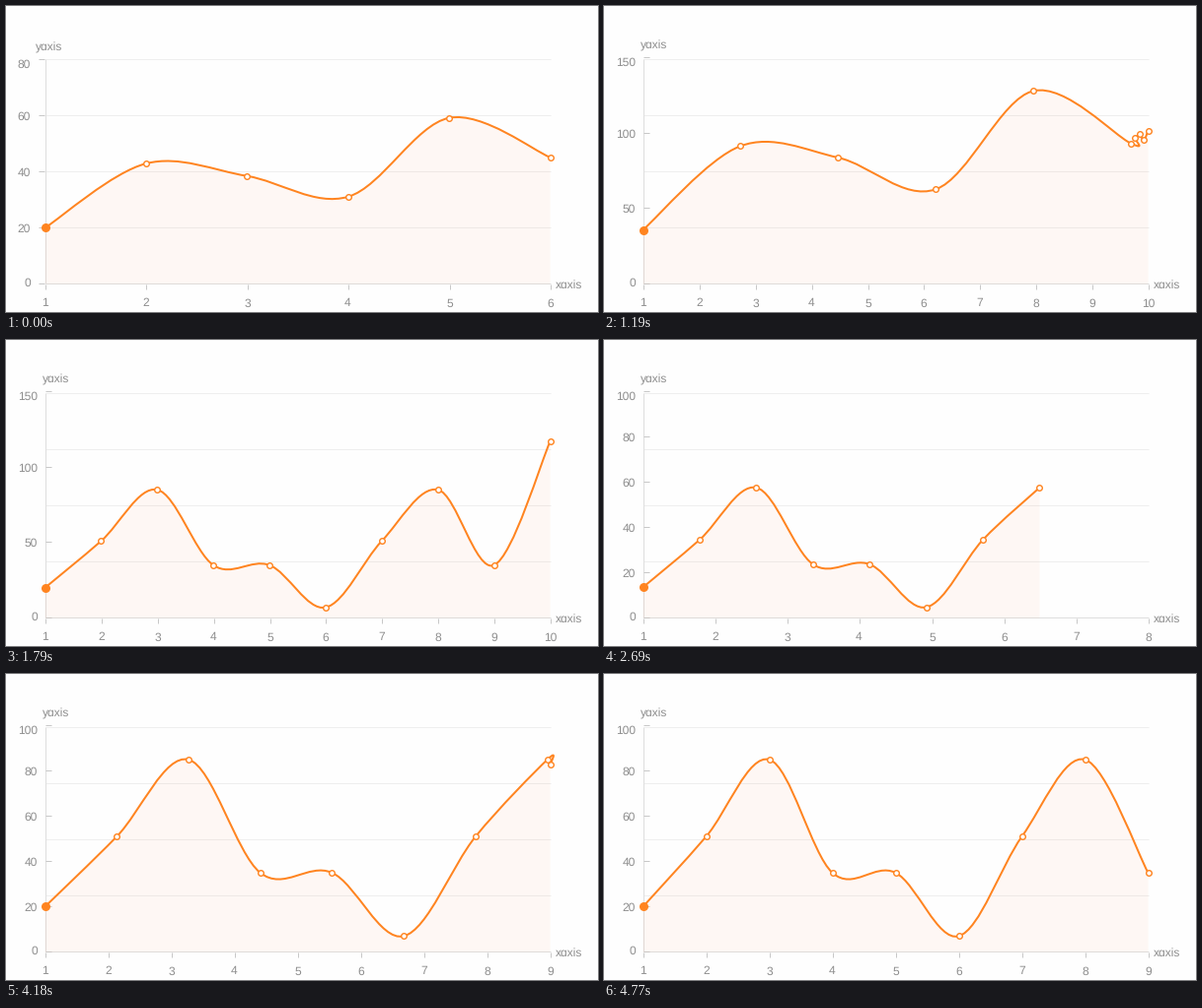
These frames come from a looping animation (600x311 px, 5.35 s). A matplotlib script:

```python
import numpy as np
import matplotlib.pyplot as plt
from matplotlib.animation import FuncAnimation
from matplotlib.path import Path
from matplotlib.patches import PathPatch

W, H, DPI = 600, 311, 100
PX = 72 / DPI                       # points per pixel
LOOP, STEP = 5350, 10               # ms
LEFT, RIGHT, BASE = 40, 552, 283

ORANGE, TEXT = "#ff8420", "#8e8e8e"
GRID, AXIS, TICK = "#eeeeee", "#dedede", "#c8c8c8"

WAVE = [20, 51, 85, 35, 35, 7, 51, 85, 35, 117]

# values, axis maximum, label step, axis top, axis title and label shift
CHARTS = [
    ([20, 51, 45, 35, 73, 54], 80, 20, 55, 0),
    (WAVE, 150, 50, 53, 7),
    (WAVE[:8], 100, 20, 53, 7),
    (WAVE[:9], 100, 20, 53, 7),
]

# chart, progress at the first step, times of the steps; linear tween
PHASES = [
    (0, 0.74, [0, 150]),
    (1, 0.077, [1190, 1340, 1490, 1640, 1790]),
    (2, 0.033, [2690, 2840, 2980, 3130, 3280]),
    (3, 0.045, [4180, 4330, 4480, 4620, 4770]),
]
TWEEN_STEP = 0.3

plt.rcParams["font.family"] = "Liberation Sans"
plt.rcParams["text.hinting"] = "none"
fig = plt.figure(figsize=(W / DPI, H / DPI), dpi=DPI, facecolor="#fefefe")
ax = fig.add_axes([0, 0, 1, 1])
# whole coordinates fall on pixel centres, counted from 1
ax.set_xlim(0.5, W + 0.5)
ax.set_ylim(H + 0.5, 0.5)
ax.axis("off")


def rule(x0, y0, x1, y1, color, z=1):
    return ax.plot([x0, x1], [y0, y1], color=color, lw=PX, zorder=z,
                   solid_capstyle="butt")[0]


def label(x, y, s, align="center"):
    return ax.text(x, y, s, ha=align, va="baseline", color=TEXT,
                   fontsize=12 * PX, zorder=2)


def points(values, peak, top):
    xs = np.linspace(LEFT, RIGHT, len(values))
    ys = BASE - np.array(values) * (BASE - top) / peak
    return np.column_stack([xs, ys])


def build_axes(values, peak, step, top, shift):
    """Ticks and labels that belong to one chart."""
    parts = [label(30 + shift, 46 - 2 * (shift > 0), "y\u0251xis", "left")]
    tick_x = 34 + shift
    for v in range(0, peak + 1, step):
        y = round(BASE - v * (BASE - top) / peak)
        nudge = -2 if v == 0 else 4 if v == peak else 0
        parts.append(rule(tick_x - 0.5, y, tick_x + 5, y, TICK))
        parts.append(label(25.5 + shift, y + nudge + 4, str(v), "right"))
    for i, x in enumerate(np.linspace(LEFT, RIGHT, len(values))):
        x = round(x)
        parts.append(rule(x, BASE + 0.5, x, BASE + 6, TICK))
        parts.append(label(x, 306, str(i + 1)))
    return parts


def smooth(p):
    """Cardinal spline through p as Bezier vertices."""
    padded = np.vstack([p[:1], p, p[-1:]])
    handle = (padded[2:] - padded[:-2]) / 6
    verts = [p[0]]
    for i in range(len(p) - 1):
        verts += [p[i] + handle[i], p[i + 1] - handle[i + 1], p[i + 1]]
    return np.array(verts)


for y in (55, 112, 169, 226):
    rule(LEFT, y, RIGHT + 0.5, y, GRID)
rule(LEFT, 55, LEFT, BASE, AXIS)
rule(LEFT, BASE, RIGHT + 0.5, BASE, AXIS)
label(557, 287, "x\u0251xis", "left")

axes_parts = [build_axes(*c) for c in CHARTS]
targets = [points(v, peak, top) for v, peak, _, top, _ in CHARTS]

empty = Path([(LEFT, BASE), (RIGHT, BASE)])
area = ax.add_patch(PathPatch(empty, fc="#ff8040", alpha=0.05, lw=0, zorder=3))
curve = ax.add_patch(PathPatch(empty, fc="none", ec=ORANGE, lw=2 * PX,
                               capstyle="butt", joinstyle="round", zorder=4))
rings, = ax.plot([], [], "o", ms=5.6 * PX, mfc="white", mec=ORANGE,
                 mew=1.4 * PX, zorder=5)
dot, = ax.plot([], [], "o", ms=9 * PX, color=ORANGE, mew=0, zorder=6)
for marks in (rings, dot):
    marks.set_snap(False)


def start_points(chart):
    """Where each point of a chart sets out from."""
    goal = targets[chart]
    if chart == 0:
        return np.column_stack([goal[:, 0], np.full(len(goal), goal[0, 1])])
    prev = targets[chart - 1]
    return prev[np.minimum(np.arange(len(goal)), len(prev) - 1)]


def state(ms):
    chart, first, times = [p for p in PHASES if p[2][0] <= ms][-1]
    done = sum(t <= ms for t in times)
    if done == len(times):
        return chart, 1.0
    return chart, first + TWEEN_STEP * (done - 1)


def update(i):
    chart, t = state(i * STEP)
    for k, parts in enumerate(axes_parts):
        for part in parts:
            part.set_visible(k == chart)

    a = start_points(chart)
    p = a + (targets[chart] - a) * t
    verts = smooth(p)
    codes = [Path.MOVETO] + [Path.CURVE4] * (len(verts) - 1)
    curve.set_path(Path(verts, codes))
    floor = [(p[-1, 0], BASE), (p[0, 0], BASE), p[0]]
    area.set_path(Path(np.vstack([verts, floor]),
                       codes + [Path.LINETO] * 2 + [Path.CLOSEPOLY]))
    rings.set_data(p[1:, 0], p[1:, 1])
    dot.set_data(p[:1, 0], p[:1, 1])
    return area, curve, rings, dot


anim = FuncAnimation(fig, update, frames=LOOP // STEP, interval=STEP,
                     repeat=True, repeat_delay=0, blit=False)
plt.show()
```
